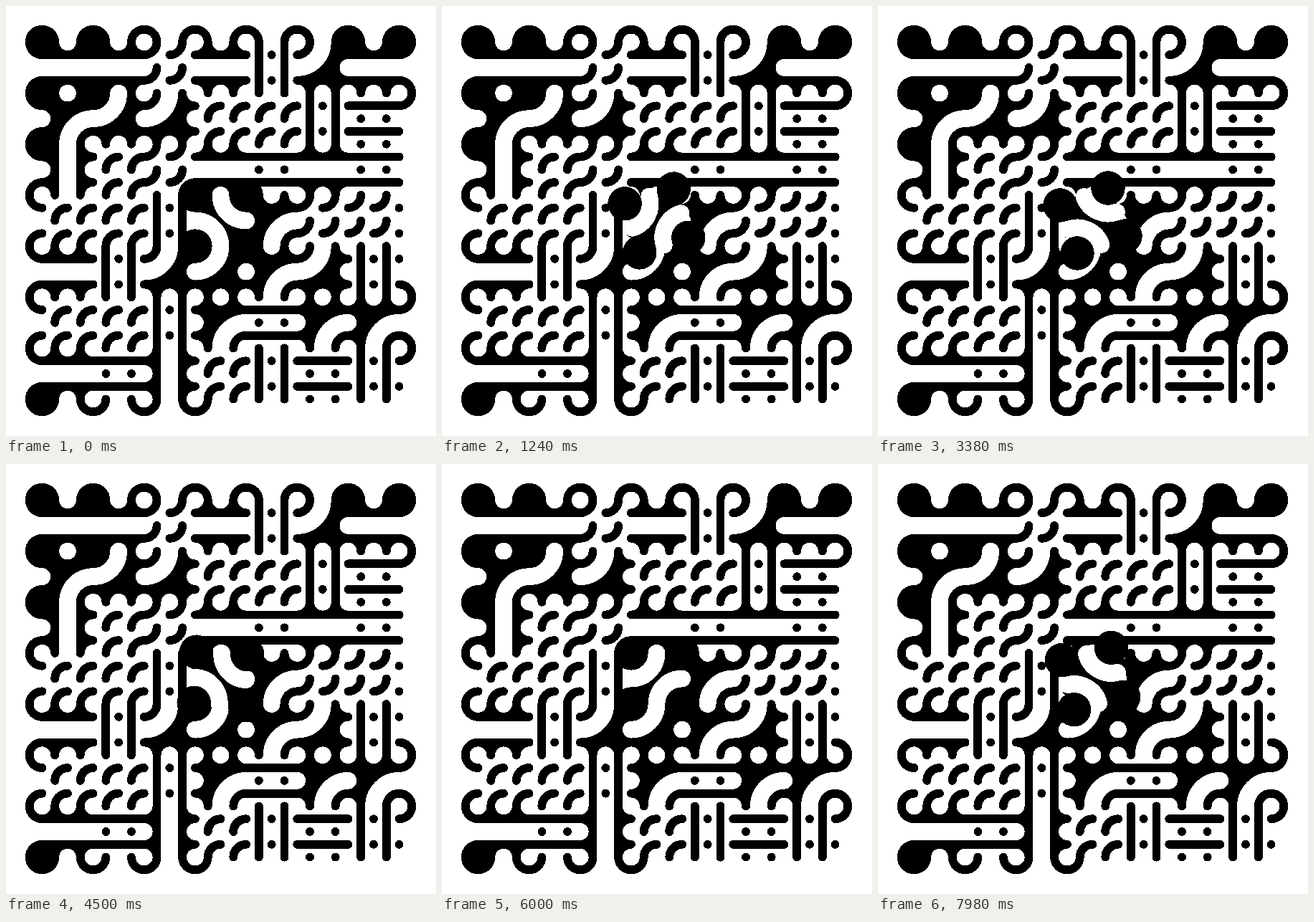
Animation, 600 px wide and 600 px high, one loop 8 s. Source, as an HTML page:

```html
<!DOCTYPE html>
<html lang="en">
<head>
<meta charset="utf-8">
<title>Multi-scale Truchet tiles</title>
<style>
  html, body { margin: 0; width: 100%; height: 100%; overflow: hidden; background: #fff; }
  svg { display: block; width: 100%; height: 100%; }
</style>
</head>
<body>
<svg id="stage" viewBox="0 0 600 600" shape-rendering="crispEdges">
  <rect width="600" height="600" fill="#fff"/>
  <g id="large"></g>
  <g id="small"></g>
  <g id="spinner"></g>
</svg>
<script>
const LOOP = 8000;
const SIZE = 71.17;
const MID = 299.5;
const ORIGIN = MID - 3.5 * SIZE;

// Motifs in a unit tile centred on 0,0
const NW = 'M-.5 0A.5 .5 0 0 0 0 -.5';
const SE = 'M.5 0A.5 .5 0 0 0 0 .5';
const H = 'M-.5 0H.5';
const V = 'M0 -.5V.5';

const LARGE = { '-': H, '|': V, j: NW, r: SE };
const SMALL = { '=': H, '!': V, J: NW, R: SE };  // split into 2 x 2
const MAP = [
  '--J-!j-',
  'rjjRR!=',
  '|RJ-=-=',
  'RR!.rJJ',
  '-!jjrj!',
  'RR!r=rr',
  '-=|R!=!'
];

const circle = (x, y, r, fill) => `<circle cx="${x}" cy="${y}" r="${r}" fill="${fill}"/>`;

// Square with wings on the corners, dots on the edges and a motif
function shape(motif, ground, ink) {
  let out = `<rect x="-.5" y="-.5" width="1" height="1" fill="${ground}"/>`;
  for (const x of [-.5, .5])
    for (const y of [-.5, .5]) out += circle(x, y, 1 / 3, ground);
  for (const e of [-.5, .5])
    out += circle(e, 0, 1 / 6, ink) + circle(0, e, 1 / 6, ink);
  return out + `<path d="${motif}" fill="none" stroke="${ink}" stroke-width="${1 / 3}"/>`;
}

const tile = (x, y, size, ...look) =>
  `<g transform="translate(${x} ${y}) scale(${size})">${shape(...look)}</g>`;

let large = '', small = '';
MAP.forEach((row, j) => [...row].forEach((key, i) => {
  const x = ORIGIN + (i + .5) * SIZE;
  const y = ORIGIN + (j + .5) * SIZE;
  if (LARGE[key]) large += tile(x, y, SIZE, LARGE[key], '#000', '#fff');
  if (SMALL[key])
    for (const dy of [-.25, .25])
      for (const dx of [-.25, .25])
        small += tile(x + dx * SIZE, y + dy * SIZE, SIZE / 2, SMALL[key], '#fff', '#000');
}));

const get = id => document.getElementById(id);
const spinner = get('spinner');
get('large').innerHTML = large;
get('small').innerHTML = small;
spinner.innerHTML = shape(NW + SE, '#000', '#fff');

// Ticks come in groups of three lasting 100, 20 and 20 ms; the loop opens on tick 0
function tickAt(ms) {
  const t = ms + 120;
  const r = t % 140;
  return 3 * Math.floor(t / 140) + (r < 100 ? 0 : r < 120 ? 1 : 2) - 2;
}

// A quarter turn takes 32 ticks, then the tile rests for 16
const TURN = 32, PERIOD = 48;

function draw(ms) {
  const tick = tickAt(ms);
  const turns = 1 + Math.floor(tick / PERIOD) + Math.min(1, tick % PERIOD / TURN);
  spinner.setAttribute('transform',
    `translate(${MID} ${MID}) rotate(${90 * turns}) scale(${SIZE})`);
}

const begin = performance.now();
function loop() {
  draw((performance.now() - begin) % LOOP);
  requestAnimationFrame(loop);
}
loop();
</script>
</body>
</html>
```
